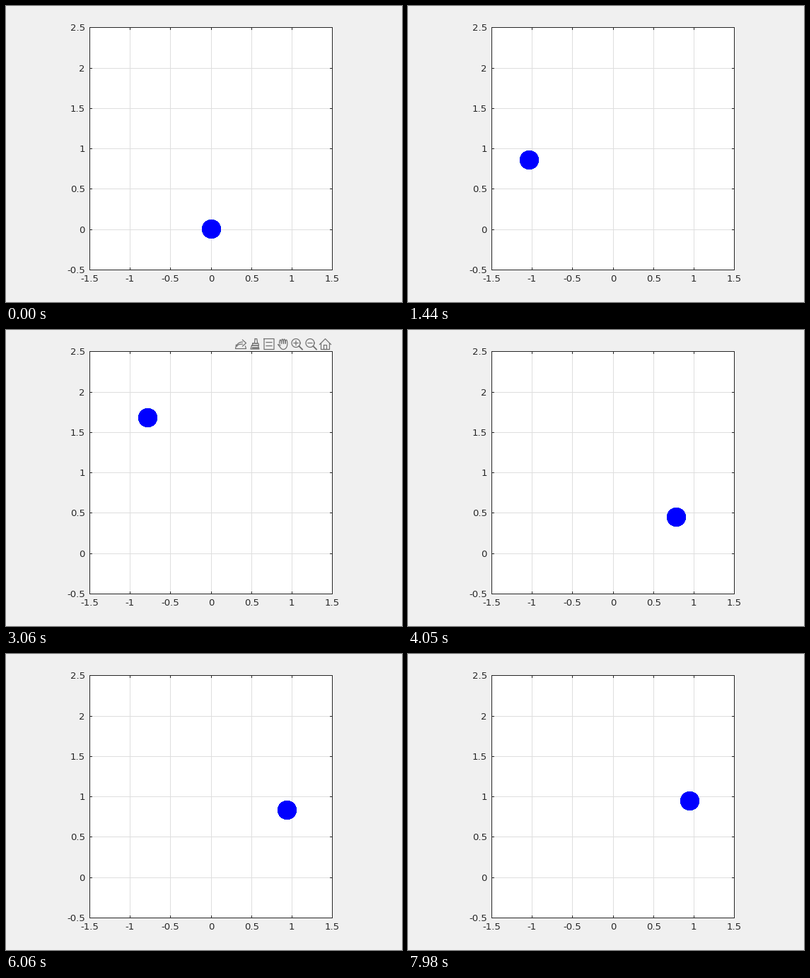
Write a matplotlib script that moves like this. It is 560x420 px and loops after 8 s.

```python
import math

import matplotlib.pyplot as plt
import numpy as np
from matplotlib.animation import FuncAnimation
from matplotlib.patches import Circle

W, H, DPI = 560, 420, 100
PX = 72 / DPI
INK, GRID, ICON = "#262626", "#dedede", "#707070"
TICK = 3.5
LOOP, INTERVAL, STEP = 8000, 20, 30
SCALE, X0, Y0 = 114.4, 290.05, 316.9

fig = plt.figure(figsize=(W / DPI, H / DPI), dpi=DPI, facecolor="#f0f0f0")
ax = fig.add_axes([0, 0, 1, 1])
ax.set_xlim(0, W)
ax.set_ylim(H, 0)
ax.axis("off")


def mid(v):
    """Centre of the pixel that holds v."""
    return math.floor(v) + 0.5


def line(xs, ys, color=INK, width=1, **kw):
    return ax.plot(xs, ys, color=color, lw=width * PX, snap=False, **kw)[0]


def label(x, y, value, align):
    ax.text(x, y, f"{value:g}", ha=align, va="baseline", color=INK,
            family="DejaVu Sans", size=13.2 * PX)


def draw_axes():
    cols = [mid(118.5 + 57.2 * i) for i in range(7)]
    rows = [mid(374.4 - 57.25 * i) for i in range(7)]
    (left, right), (bottom, top) = cols[::6], rows[::6]
    box = [left, right, right, left, left], [top, top, bottom, bottom, top]
    ax.fill(*box, "white", lw=0)
    for x, y in zip(cols[1:-1], rows[1:-1]):
        line([x, x], [top, bottom], GRID)
        line([left, right], [y, y], GRID)
    for i, (x, y) in enumerate(zip(cols, rows)):
        for d, x_end, y_end in ((1, left, top), (-1, right, bottom)):
            line([x, x], [y_end, y_end + d * TICK], solid_capstyle="butt")
            line([x_end, x_end + d * TICK], [y, y], solid_capstyle="butt")
        label(x - 0.2, 391, -1.5 + i / 2, "center")
        label(112, y + 4.5, -0.5 + i / 2, "right")
    line(*box, solid_joinstyle="miter")


def stroke(*points, width=1.2):
    return line(*zip(*points), ICON, width)


def trapezoid(x, top, bottom, w_top, w_bottom):
    a, b = w_top / 2, w_bottom / 2
    return stroke((x - a, top), (x + a, top), (x + b, bottom),
                  (x - b, bottom), (x - a, top))


def arc(x, y, rx, ry, start=0, end=360):
    a = np.radians(np.linspace(start, end, 40))
    return line(x + rx * np.cos(a), y + ry * np.sin(a), ICON, 1.2)


def export_icon(x):
    return [stroke((x - 6, 21), (x - 7, 26.5), (x + 8, 26.5), (x + 7, 23)),
            arc(x + 3, 23, 8, 6, 180, 270), arc(x + 3, 23, 8, 3, 180, 270),
            stroke((x + 3, 14), (x + 8, 18.5), (x + 3, 23))]


def brush_icon(x):
    return [trapezoid(x + 1.5, 12.5, 19, 2.5, 4.5),
            trapezoid(x + 1, 19, 22, 8, 9),
            trapezoid(x, 22, 27, 9, 12),
            stroke((x - 3, 25.5), (x + 4, 25.5), width=2.4)]


def note_icon(x):
    return [trapezoid(x, 12.5, 27.5, 14, 14),
            *(stroke((x - 4, y), (x + 4, y)) for y in (17.5, 22.5))]


def hand_icon(x):
    fingers = [arc(x - 4 + 2.8 * k, 19, 1.4, 6.5 - abs(k - 1.5), 180, 360)
               for k in range(4)]
    return fingers + [arc(x + 0.2, 20, 5.6, 7.5, 0, 150),
                      stroke((x - 4.6, 24), (x - 7.5, 20.5), (x - 4, 21.5))]


def zoom_icon(x, plus):
    parts = [arc(x - 2, 18.5, 6, 6), stroke((x - 5, 18.5), (x + 1, 18.5)),
             stroke((x + 2.5, 23), (x + 7, 27.5), width=1.8)]
    if plus:
        parts.append(stroke((x - 2, 15.5), (x - 2, 21.5)))
    return parts


def home_icon(x):
    return [stroke((x - 8, 20.5), (x, 12.5), (x + 8, 20.5)),
            stroke((x - 6, 19), (x - 6, 27.5), (x + 6, 27.5), (x + 6, 19)),
            trapezoid(x, 21.5, 27.5, 4, 4)]


def draw_toolbar():
    return (export_icon(331.5) + brush_icon(352) + note_icon(372)
            + hand_icon(392) + zoom_icon(412, True) + zoom_icon(432, False)
            + home_icon(451.5))


draw_axes()
toolbar = draw_toolbar()
rim = Circle((X0, Y0), 13.2, fc="#0072bd", lw=0, antialiased=False, zorder=5)
ball = Circle((X0, Y0), 12.95, fc="#0000ff", lw=0, antialiased=False, zorder=6)
ax.add_patch(rim)
ax.add_patch(ball)


def ramp(t, start, end):
    return min(1, max(0, (t - start) / (end - start)))


def update(i):
    t = i * INTERVAL
    n = (t + INTERVAL // 2) // STEP
    # semi-implicit circular motion, 0.1 rad per step
    angle = 0.1 * n + 0.05
    x = math.sin(angle) - 0.05
    y = 1 - math.cos(angle)
    for disc in (rim, ball):
        disc.center = (mid(X0 + SCALE * x), mid(Y0 - SCALE * y))
    alpha = ramp(t, 1860, 2040) * (1 - ramp(t, 3150, 3360))
    for part in toolbar:
        part.set_alpha(alpha)
        part.set_visible(alpha > 0)
    return [rim, ball, *toolbar]


anim = FuncAnimation(fig, update, frames=LOOP // INTERVAL, interval=INTERVAL,
                     repeat=True, repeat_delay=0, blit=False)
plt.show()
```
